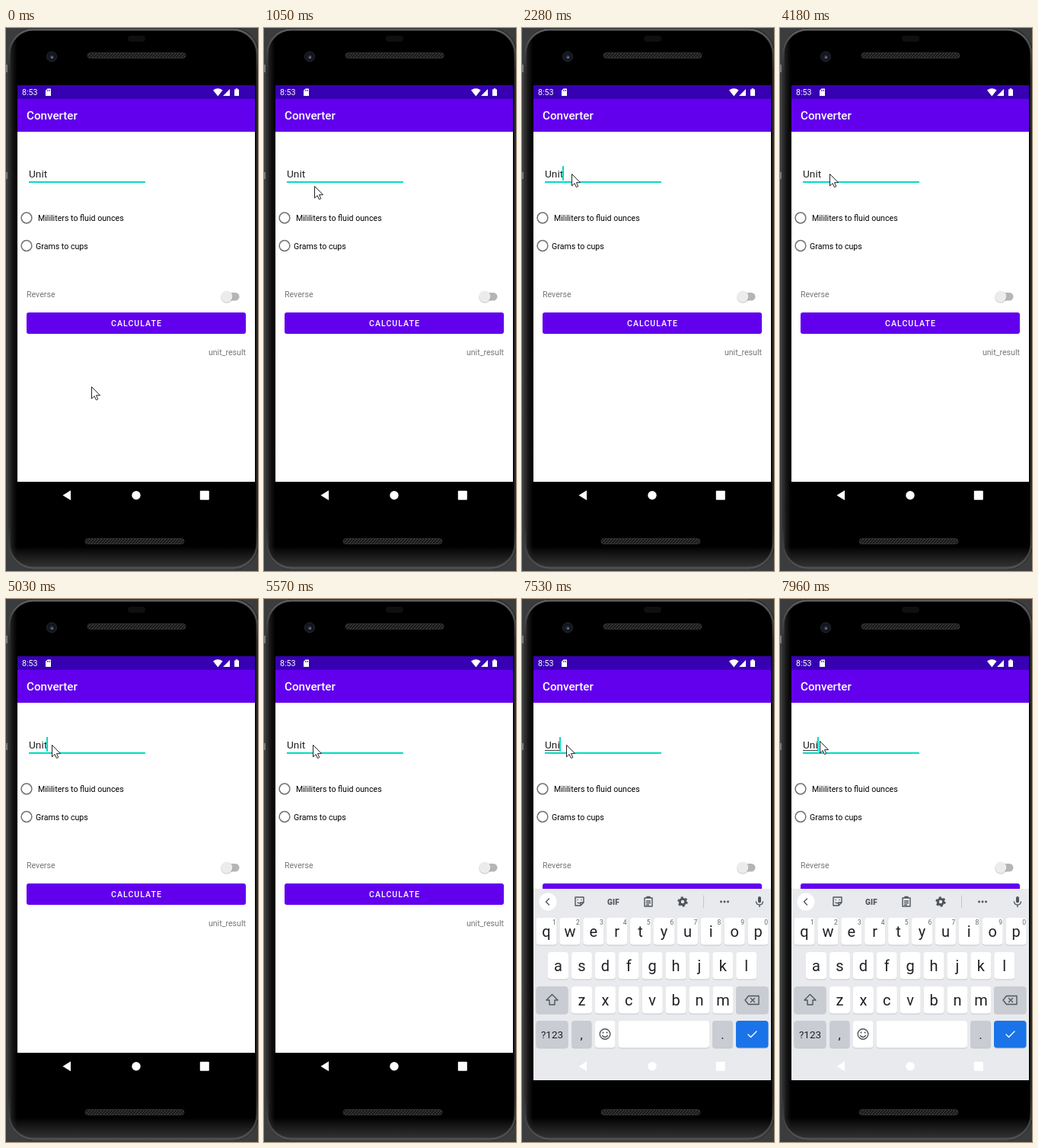
Write an HTML page that moves like this. It is 331 by 712 pixels and loops after 8 s.

```html
<!DOCTYPE html>
<html lang="en">
<head>
<meta charset="utf-8">
<title>Converter</title>
<style>
html, body { margin: 0; height: 100%; overflow: hidden; background: #000; }
svg { display: block; width: 331px; height: 712px; font: 10.63px Roboto, sans-serif; }
.line { fill: none; stroke: #50555b; stroke-width: 1.4; stroke-linejoin: round; stroke-linecap: round; }
.medium { font-weight: 500; }
</style>
</head>
<body>
<svg viewBox="0 0 331 712">
  <defs>
    <linearGradient id="side">
      <stop offset="0" stop-color="#343536"/><stop offset=".012" stop-color="#1c1c1c"/>
      <stop offset=".035" stop-color="#000"/>
    </linearGradient>
    <linearGradient id="chin" x2="0" y2="1">
      <stop offset="0" stop-color="#333" stop-opacity="0"/><stop offset=".7" stop-color="#2a2a2a"/>
      <stop offset="1" stop-color="#3a3a3a"/>
    </linearGradient>
    <linearGradient id="edge" x2="0" y2="1">
      <stop offset="0" stop-color="#5c5c5c"/><stop offset=".08" stop-color="#2c2c2c"/>
      <stop offset=".92" stop-color="#2c2c2c"/><stop offset="1" stop-color="#505050"/>
    </linearGradient>
    <pattern id="mesh" width="4" height="4" patternUnits="userSpaceOnUse">
      <rect width="4" height="4" fill="#1a1a1a"/>
      <path d="M0 4L4 0" stroke="#444"/>
    </pattern>
    <clipPath id="body"><rect x="3" y="0" width="329" height="710" rx="34"/></clipPath>
  </defs>

  <g id="phone">
    <rect width="331" height="712" fill="#3a3c3e"/>
    <g clip-path="url(#body)">
      <path fill="url(#side)" d="M3 0h328v712H3z"/>
      <path fill="url(#chin)" d="M3 680h328v32H3z"/>
      <rect x="4" y="2" width="326" height="706" rx="32" fill="none" stroke="url(#edge)" stroke-width="3"/>
    </g>
    <path d="M1 48v10M1 189v9" stroke="#77797b" stroke-width="2"/>
    <rect x="160" y="10" width="23" height="8" rx="4" fill="#0f0f0f"/>
    <g fill="url(#mesh)" stroke="#303030">
      <rect x="107" y="32.500" width="129" height="7" rx="3.500"/>
      <rect x="104" y="669.500" width="130" height="7" rx="3.500"/>
    </g>
    <circle cx="60" cy="37.500" r="6.500" fill="#14151a" stroke="#2a2b2f"/>
    <circle cx="60" cy="38" r="3" fill="#20263f"/>
    <circle cx="60.500" cy="38.500" r="1.300" fill="#6f86b5"/>
  </g>

  <g id="app">
    <path d="M15 75h312v556H15z"/>
    <path fill="#fff" d="M15 136h312v459H15z"/>
    <path fill="#3700b3" d="M15 75h312v18H15z"/>
    <path fill="#6200ee" d="M15 93h312v43H15z"/>
    <path fill="#000" opacity=".08" d="M15 136h312v1H15z"/>
    <g fill="#fff">
      <text x="21" y="87.800">8:53</text>
      <path d="M54.500 79.500h4.500v9.500h-7v-7z"/>
      <path d="M54.500 81v2M56 81v2M57.500 81v2" stroke="#3700b3" stroke-width=".7"/>
      <path d="M272 81.500q6.300-4.500 12.600 0L278.300 89.500zM294 80v9h-9zM300 80.500h1.700v-1.300h2.600v1.300h1.700v8.500h-6z"/>
      <text x="27" y="120" font-size="15.200" class="medium">Converter</text>
    </g>
    <text id="unit" x="30" y="196" font-size="13.670" fill="#212121">Unit</text>
    <path fill="#03dac5" d="M30 201h153v2H30z"/>
    <g fill="none" stroke="#727272" stroke-width="1.500">
      <circle cx="27" cy="249" r="6.900"/><circle cx="27" cy="285.500" r="6.900"/>
    </g>
    <text x="42" y="253">Mililiters to fluid ounces</text>
    <text x="39" y="289.500">Grams to cups</text>
    <g fill="#757575">
      <text x="27" y="353">Reverse</text>
      <text x="315" y="429" text-anchor="end">unit_result</text>
    </g>
    <rect x="284" y="347" width="22.500" height="10.500" rx="5.250" fill="#b5b5b5"/>
    <circle cx="290" cy="353" r="7.800" fill="#000" opacity=".18"/>
    <circle cx="290" cy="352" r="7.500" fill="#ececec"/>
    <rect x="27" y="373" width="288" height="28" rx="3" fill="#6200ee"/>
    <text x="171.500" y="391" class="medium" fill="#fff" text-anchor="middle" letter-spacing="1">CALCULATE</text>
  </g>

  <g id="keyboard">
    <path fill="#e8eaed" d="M15 380h312v251H15z"/>
    <circle cx="34" cy="397" r="11.500" fill="#fff"/>
    <g class="line">
      <path d="M35.500 393l-4 4 4 4"/>
      <path d="M70 391h11v7l-4 4h-7zM77 402v-4h4M73 394.500h.1M78 394.500h.1M73 398q1.500 1.500 3 .5"/>
      <path d="M161 392h10v11h-10zM164 392v-1.500h4v1.500M163.500 396h5M163.500 398.500h5M163.500 401h3"/>
      <circle cx="211" cy="397" r="3.700" stroke-width="3"/>
      <circle cx="211" cy="397" r="5.700" stroke-width="2" stroke-linecap="butt" stroke-dasharray="2.980"/>
      <path d="M238.500 389v16" stroke="#c4c7ca" stroke-width="1"/>
      <path d="M261.500 397h.1M266 397h.1M270.500 397h.1" stroke-width="2.800"/>
      <path d="M312 392v4.500" stroke-width="4"/>
      <path d="M307.500 397q.5 4 4.500 4t4.500-4M312 401v2.500"/>
    </g>
    <text x="120" y="400.500" font-size="10" font-weight="900" fill="#50555b" text-anchor="middle" letter-spacing=".3">GIF</text>
    <g id="keys"></g>
    <g class="line">
      <path d="M39.500 518.500l7.500 7.500h-4v6h-7v-6h-4z"/>
      <path d="M297.500 520.500h13.500v11h-13.500l-4.500-5.500zM300.500 523.500l5 5M305.500 523.500l-5 5"/>
      <circle cx="109" cy="570.500" r="6.800"/>
      <path d="M106.500 568.500h.1M111.500 568.500h.1" stroke-width="2"/>
      <path d="M105.500 572.500q3.500 4 7 0"/>
      <path d="M297 571l3.500 3.500 7.500-7.500" stroke="#fff"/>
    </g>
  </g>

  <g id="navigation" fill="#fff">
    <path d="M74.500 612.700l10.500-6.500v13z"/>
    <circle cx="171" cy="612.700" r="5.700"/>
    <rect x="254.800" y="606.700" width="12" height="12" rx="1"/>
  </g>
  <path id="underline" fill="#444" d="M30 198h19.500v1H30z"/>
  <rect id="caret" y="181" width="2" height="19" fill="#03dac5"/>
  <path id="pointer" fill="#fff" stroke="#222" d="M.5.5v15.500l3.600-3.300 2.300 5 2.400-1-2.300-5h5z"/>
</svg>
<script>
const el = id => document.getElementById(id);
const LOOP = 8000, KEYBOARD_AT = 7530;

// Each entry: time, x, y
const pointerSteps = [
  [0, 112, 470], [810, 108, 430], [930, 91, 326], [1050, 66, 207],
  [1170, 50, 131], [1290, 65, 138], [1410, 76, 155], [1560, 76, 146],
  [1710, 76, 179], [1860, 75, 187], [1980, 73, 191], [2130, 65, 191],
  [5030, 60, 191], [5150, 56, 191], [5300, 53, 191], [5450, 59, 191],
  [5570, 64, 191], [7400, 62, 191], [7530, 58, 191], [7680, 53, 188],
  [7820, 52, 188], [7960, 52, 186]
];
const caretToggles = [400, 930, 1410, 1860, 2280, 4180, 4740, 5150, KEYBOARD_AT];

function label(x, y, size, color, text) {
  return `<text x="${x}" y="${y}" font-size="${size}" fill="${color}" text-anchor="middle">${text}</text>`;
}
function key(x, y, width, text = "", fill = "#fff", size = 20) {
  const box = (dy, color) =>
    `<rect x="${x}" y="${y + dy}" width="${width}" height="35.500" rx="4" fill="${color}"/>`;
  const baseline = y + 18 + size * 0.34;
  return box(1, "#c3c5c9") + box(0, fill) + label(x + width / 2, baseline, size, "#202124", text);
}
function row(letters, x, y) {
  return [...letters].map((c, i) => key(x + i * 30.9, y, 27, c)).join("");
}

const grey = "#c9ccd3";
el("keys").innerHTML =
  row("qwertyuiop", 18.5, 418) + row("asdfghjkl", 34, 463) + row("zxcvbnm", 65, 508) +
  [..."1234567890"].map((c, i) => label(42.5 + i * 30.9, 427, 8.5, "#5f6368", c)).join("") +
  key(18.5, 508, 42, "", grey) + key(281, 508, 42.5, "", grey) +
  key(18.5, 553, 42, "?123", grey, 13.5) + key(65, 553, 26.5, ",", grey, 17) +
  key(96, 553, 26.5) + key(126.5, 553, 119.5) +
  key(250, 553, 27, ".", grey, 17) + key(281, 553, 42.5, "", "#1a73e8");

const show = (id, on) => el(id).setAttribute("visibility", on ? "visible" : "hidden");

function draw(now) {
  const t = now % LOOP;
  const typing = t >= KEYBOARD_AT;
  const [, x, y] = pointerSteps.findLast(step => t >= step[0]);
  el("pointer").setAttribute("transform", `translate(${x} ${y})`);
  el("unit").textContent = typing ? "Uni" : "Unit";
  el("caret").setAttribute("x", typing ? 49 : 53);
  show("caret", caretToggles.filter(time => t >= time).length % 2);
  show("keyboard", typing);
  show("underline", typing);
  requestAnimationFrame(draw);
}
draw(0);
</script>
</body>
</html>
```
